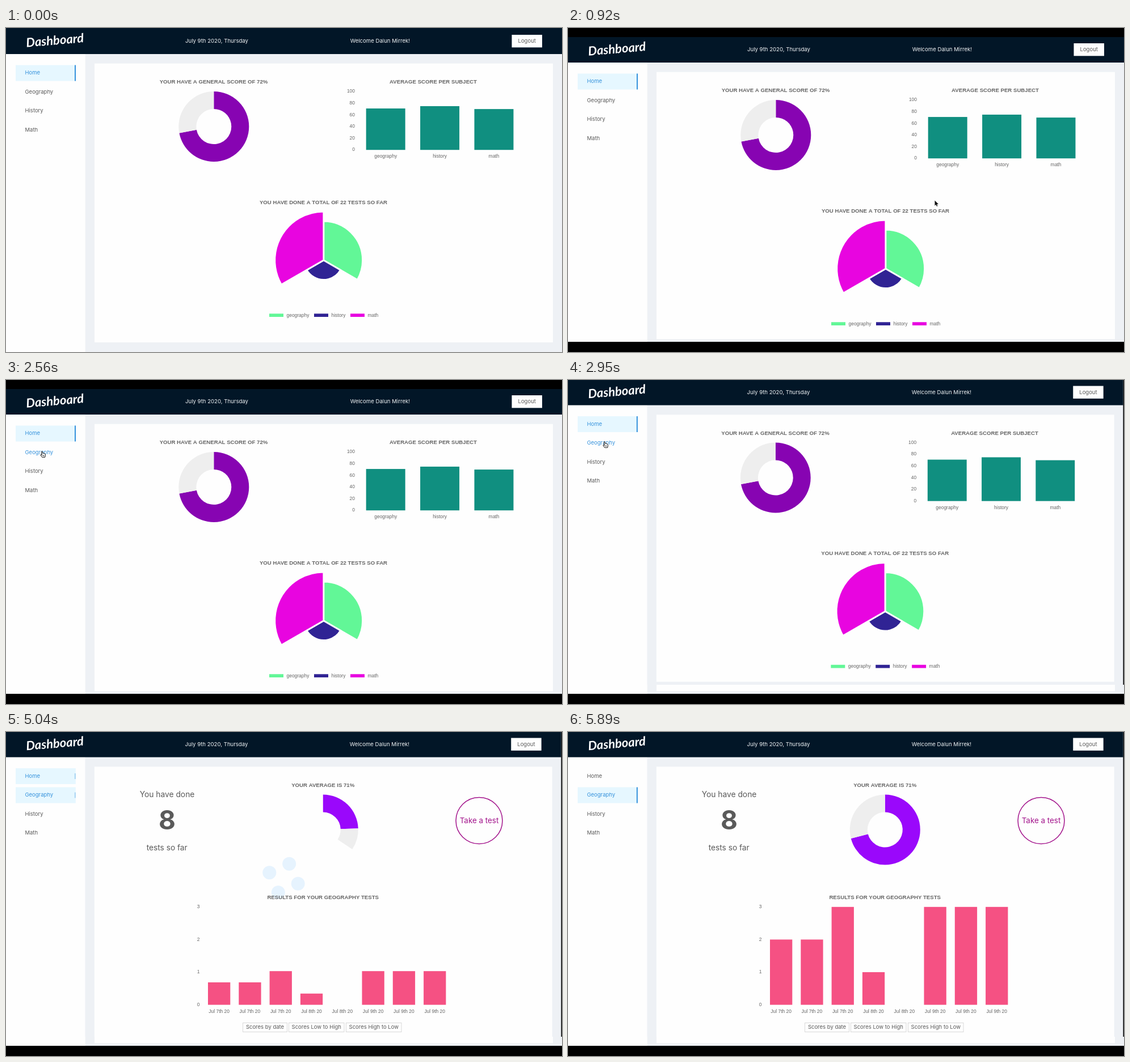
Animation, 980 px wide and 572 px high, one loop 8000 ms. Source, as an HTML page with a canvas:

```html
<!DOCTYPE html>
<html>
<head>
<meta charset="utf-8">
<style>
  html, body { margin: 0; width: 100%; height: 100%; overflow: hidden; background: #000; }
  canvas { display: block; }
</style>
</head>
<body>
<canvas id="stage" width="980" height="572"></canvas>
<script>
const c = document.getElementById('stage').getContext('2d');
const UI = 'Inter, sans-serif', CHART = '"Liberation Sans", Arial, sans-serif';
const GREY = '#5a5a5a', BLUE = '#3592dc', LABEL = '#666';
const TAU = Math.PI * 2, TOP = -Math.PI / 2;

const clamp = x => Math.max(0, Math.min(1, x));
const ramp = (t, a, b) => clamp((t - a) / (b - a));
const lerp = (a, b, k) => a + (b - a) * k;
const outQuart = x => 1 - (1 - x) ** 4;
const outQuad = x => 1 - (1 - x) ** 2;
const inOut = x => x * x * (3 - 2 * x);

function rect(x0, y0, x1, y1, fill) {
  c.fillStyle = fill;
  c.fillRect(x0, y0, x1 - x0, y1 - y0);
}

function text(s, x, y, size, { font = UI, color = GREY, align = 'left', style = '' } = {}) {
  c.font = `${style} ${size}px ${font}`;
  c.fillStyle = color;
  c.textAlign = align;
  c.textBaseline = 'middle';
  c.fillText(s, x, y);
}

const title = (s, x, y) =>
  text(s, x, y, 9.65, { font: CHART, color: LABEL, align: 'center', style: 'bold' });
const label = (s, x, y, align = 'center') =>
  text(s, x, y, 8.45, { font: CHART, color: LABEL, align });

function ring(x, y, from, to, fill) {
  c.beginPath();
  c.arc(x, y, 62, TOP + from * TAU, TOP + to * TAU);
  c.arc(x, y, 31, TOP + to * TAU, TOP + from * TAU, true);
  c.fillStyle = fill;
  c.fill();
}

function donut(x, y, share, color, p = 1) {
  ring(x, y, 0, share * p, color);
  ring(x, y, share * p, p, '#eee');
}

function clipped(x, y, w, h, draw) {
  c.save();
  c.beginPath();
  c.rect(x, y, w, h);
  c.clip();
  draw();
  c.restore();
}

function menuRow(i, name, sel, bar, blue) {
  const y = 79.5 + 33.5 * i;
  c.globalAlpha = sel;
  rect(17, y - 14, 123, y + 14, '#e6f7ff');
  c.globalAlpha = bar;
  rect(121, y - 14 * bar, 123, y + 14 * bar, BLUE);
  c.globalAlpha = 1 - blue;
  text(name, 33.5, y, 9.5);
  c.globalAlpha = blue;
  text(name, 33.5, y, 9.5, { color: BLUE });
  c.globalAlpha = 1;
}

function home() {
  title('YOUR HAVE A GENERAL SCORE OF 72%', 366, 95.5);
  donut(366.3, 174, 0.72, '#8704b2');

  title('AVERAGE SCORE PER SUBJECT', 753, 95.5);
  for (let v = 0; v <= 100; v += 20) label(v, 615, 215 - v * 1.03, 'right');
  const subjects = ['geography', 'history', 'math'];
  [71, 75, 70].forEach((v, i) => {
    const x = 634.7 + 95.4 * i;
    rect(x, 215.2 - v * 1.03, x + 69, 215.2, '#108f80');
    label(subjects[i], x + 34.5, 227);
  });

  title('YOU HAVE DONE A TOTAL OF 22 TESTS SO FAR', 559.5, 308);
  const colors = ['#62f797', '#302394', '#e805e0'], legendX = [464, 543, 607];
  [8, 4, 10].forEach((n, i) => {
    c.beginPath();
    c.moveTo(559.8, 410);
    c.arc(559.8, 410, n * 8.6, TOP + i * TAU / 3, TOP + (i + 1) * TAU / 3);
    c.closePath();
    c.fillStyle = colors[i];
    c.fill();
    c.strokeStyle = '#fefefe';
    c.lineWidth = 2.8;
    c.stroke();
    rect(legendX[i], 504.3, legendX[i] + 25, 510, colors[i]);
    label(subjects[i], legendX[i] + 30.5, 507.3, 'left');
  });
}

function page(bottom, t, content) {
  rect(0, 0, 980, 572, '#eef1f5');
  rect(0, 0, 139.7, 572, '#fefefe');
  rect(156, 62.7, 964, bottom, '#fefefe');
  rect(0, 0, 980, 46, '#021627');

  c.save();
  c.translate(35.5, 27);
  c.rotate(-0.085);
  text('Dashboard', 0, 0, 22, { font: 'Lato, sans-serif', color: '#fff', style: 'italic bold' });
  c.restore();
  text('July 9th 2020, Thursday', 316, 23.4, 9.6, { color: '#f2f4f6' });
  text('Welcome Dalun Mirrek!', 606.7, 23.4, 9.6, { color: '#f2f4f6' });
  rect(891.5, 12, 945, 34.3, '#fefefe');
  text('Logout', 918.2, 23.4, 9.5, { align: 'center' });

  const leave = ramp(t, 5035, 5320), bar = ramp(t, 4970, 5120);
  menuRow(0, 'Home', 1 - leave, 1 - outQuad(bar), 1 - leave);
  menuRow(1, 'Geography', ramp(t, 4700, 4980), inOut(bar), ramp(t, 1860, 2160));
  menuRow(2, 'History', 0, 0, 0);
  menuRow(3, 'Math', 0, 0, 0);
  if (content) home();
}

function loader(t) {
  c.globalAlpha = clamp((5065 - t) / 350);
  c.fillStyle = '#1890ff';
  for (let i = 0; i < 4; i++) {
    const a = (-69 + (t - 5030) * 0.3 + 90 * i) * TAU / 360;
    c.beginPath();
    c.arc(489.5 + 27 * Math.cos(a), 258 + 27 * Math.sin(a), 12, 0, TAU);
    c.fill();
  }
  c.globalAlpha = 1;
}

function geography(p) {
  const mid = { align: 'center' };
  text('You have done', 284, 110.5, 13.8, mid);
  text('8', 284, 158, 46, { align: 'center', style: 'bold' });
  text('tests so far', 283.7, 204.5, 13.7, mid);

  title('YOUR AVERAGE IS 71%', 558.7, 94);
  donut(558.8, 172.5, 0.71, '#9a08fb', p);

  c.beginPath();
  c.arc(834, 156.5, 41, 0, TAU);
  c.strokeStyle = '#a3148c';
  c.lineWidth = 1.5;
  c.stroke();
  text('Take a test', 834, 157, 13.4, { align: 'center', color: '#a3148c' });

  title('RESULTS FOR YOUR GEOGRAPHY TESTS', 558.7, 292.5);
  for (let v = 0; v < 4; v++) label(v, 341.5, 481.5 - v * 57.6, 'right');
  const days = [7, 7, 7, 8, 8, 9, 9, 9];
  [2, 2, 3, 1, 0, 3, 3, 3].forEach((v, i) => {
    const x = 356 + 54.3 * i;
    rect(x, 481.6 - v * 57.6 * p, x + 39.3, 481.6, '#f55183');
    label(`Jul ${days[i]}th 20`, x + 19.6, 493.5);
  });

  c.strokeStyle = '#d9d9d9';
  c.lineWidth = 1;
  [['Scores by date', 417.5, 495.5], ['Scores Low to High', 498.5, 596],
   ['Scores High to Low', 599.5, 697]].forEach(([s, a, b]) => {
    c.strokeRect(a, 513.5, b - a, 16);
    text(s, (a + b) / 2, 521.5, 9.5, mid);
  });
}

const ARROW = new Path2D('M0 0V9.2L2.1 7.3 3.5 10.4 4.9 9.8 3.6 6.8 6.4 6.6Z');
const HAND = new Path2D('M2 1Q2.8 0 3.6 1L4.4 4 6 3.8 7.2 4.4 8.4 5Q9.2 5.6 8.8 7.4L8 11H3.4L.4 7Q.6 5.8 2.8 7Z');

function cursor(shape, x, y) {
  const hand = shape === HAND;
  c.save();
  c.translate(x, y);
  c.lineWidth = hand ? 0.9 : 1.2;
  c.strokeStyle = hand ? '#222' : '#fff';
  c.fillStyle = hand ? '#fff' : '#111';
  c.lineJoin = 'round';
  c.stroke(shape);
  c.fill(shape);
  if (hand) {
    c.stroke(shape);
    c.beginPath();
    c.moveTo(4.4, 7); c.lineTo(4.6, 9.2);
    c.moveTo(6.2, 7); c.lineTo(6.2, 9.2);
    c.stroke();
  }
  c.restore();
}

function pointer(t) {
  if (t < 920 || t >= 4740) return;
  if (t >= 2560) return cursor(HAND, t < 2860 ? 60.5 : 61.5, t < 2860 ? 125.5 : t < 2950 ? 117 : 108.5);
  if (t < 1110) return cursor(ARROW, 646.5, 304.5);
  if (t < 1190) return cursor(ARROW, 421, 254);
  const k = outQuad(ramp(t, 1430, 1880));
  cursor(ARROW, lerp(196, 62, k), lerp(203, 126, k));
}

function step(t) {
  const hold = (from, size) => from + Math.floor((t - from) / size) * size;
  if (t >= 1520 && t < 2160) return hold(1520, 91.4);
  if (t >= 4640 && t < 5890) return hold(4640, 97.5);
  return t < 1520 && t >= 1190 ? 1190 : t;
}

function lowPage(t, dy) {
  c.translate(0, dy);
  page(534.3, t, true);
}

function draw(now) {
  const t = step(now % 8000);
  rect(0, 0, 980, 572, '#000');
  if (t < 150) {
    page(555, t, true);
  } else {
    clipped(0, 16, 980, 538, () => lowPage(t, 15));
    if (t >= 2860) {
      const dy = t < 2950 ? 7 : -1.5, blank = t >= 4830;
      rect(0, 0, 980, 538, '#000');
      clipped(0, Math.max(0, dy + 1), 978.8, 538 - Math.max(0, dy + 1), () => {
        c.translate(0, dy);
        c.scale(0.9986, 1);
        page(blank ? 560 : 534.3, t, !blank);
      });
      if (blank) {
        loader(t);
        if (t >= 4930) geography(t >= 5890 ? 1 : outQuart(ramp(t, 4930, 5930)));
      }
    }
  }
  pointer(t);
}

(function loop() {
  draw(performance.now());
  requestAnimationFrame(loop);
})();
</script>
</body>
</html>
```
